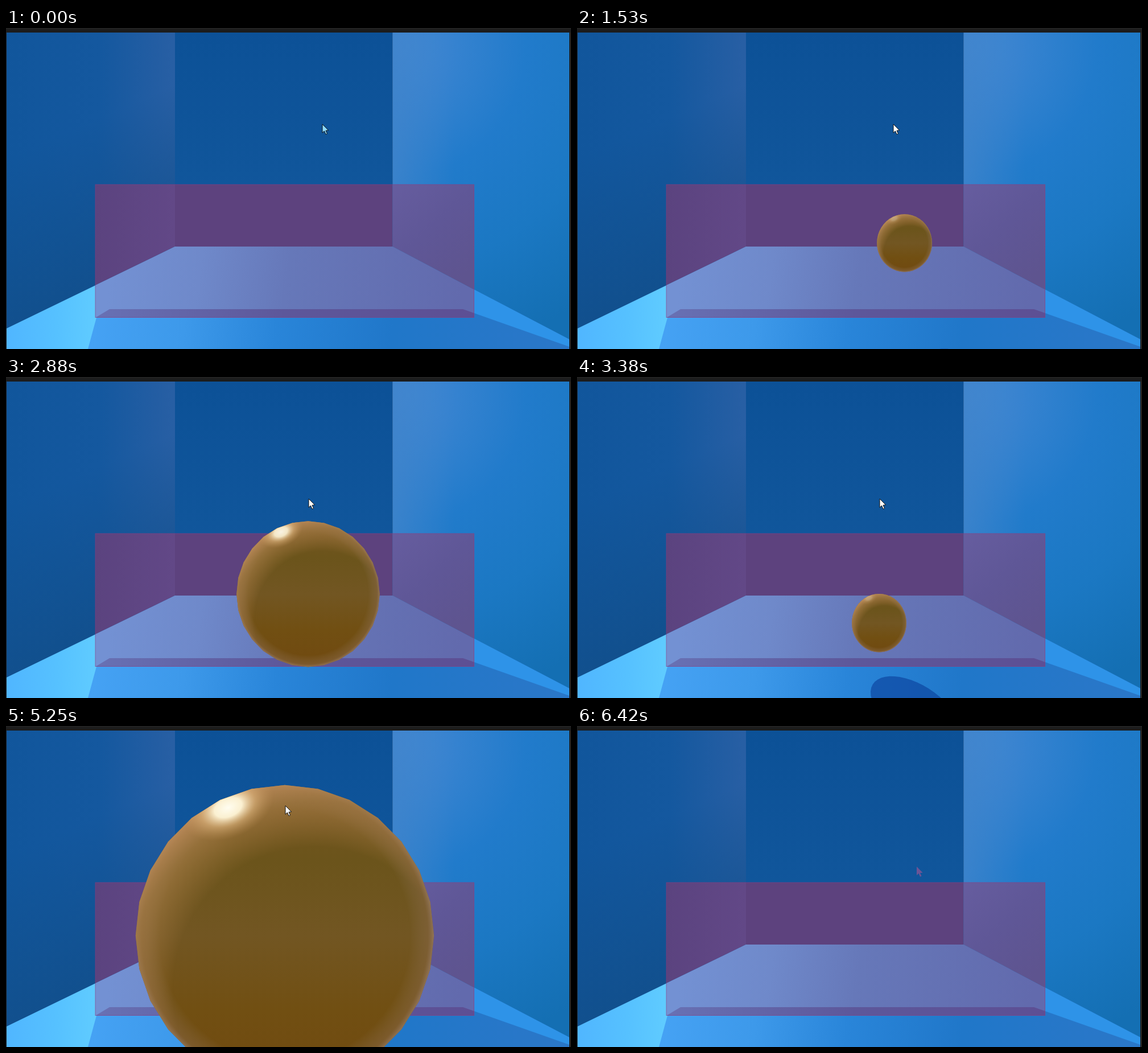
An HTML page that plays this animation: 993 by 564 pixels, repeating every 7120 ms.

```html
<!DOCTYPE html>
<html lang="en">
<head>
<meta charset="utf-8">
<title>Ball throw</title>
<style>
html, body { margin: 0; width: 100%; height: 100%; overflow: hidden; background: #1c1c1c; }
svg { display: block; width: 100vw; height: 100vh; }
</style>
</head>
<body>
<svg viewBox="0 0 993 564" preserveAspectRatio="none">
  <defs>
    <linearGradient id="leftWall"><stop offset="0" stop-color="#11569c"/><stop offset=".55" stop-color="#14589f"/><stop offset="1" stop-color="#285fa4"/></linearGradient>
    <linearGradient id="leftShade" x2=".25" y2="1"><stop offset=".4" stop-color="#114f8c" stop-opacity="0"/><stop offset="1" stop-color="#114f8c"/></linearGradient>
    <linearGradient id="backWall" x2="0" y2="1"><stop offset="0" stop-color="#0c5197"/><stop offset="1" stop-color="#12589d"/></linearGradient>
    <radialGradient id="rightWall" gradientUnits="userSpaceOnUse" cx="679" cy="30" r="560"><stop offset="0" stop-color="#4489d4"/><stop offset=".18" stop-color="#3783d0"/><stop offset=".42" stop-color="#217bcb"/><stop offset=".7" stop-color="#1b78c3"/><stop offset="1" stop-color="#146fb3"/></radialGradient>
    <linearGradient id="rightEdge"><stop offset="0" stop-color="#4084cb" stop-opacity=".8"/><stop offset=".35" stop-color="#4084cb" stop-opacity="0"/></linearGradient>
    <linearGradient id="floor" gradientUnits="userSpaceOnUse" x1="150" y1="520" x2="960" y2="590"><stop offset="0" stop-color="#45a2f4"/><stop offset=".2" stop-color="#3d99ea"/><stop offset=".4" stop-color="#2985d9"/><stop offset=".65" stop-color="#2077c9"/><stop offset="1" stop-color="#2a77c8"/></linearGradient>
    <linearGradient id="lit"><stop offset="0" stop-color="#50b6ff"/><stop offset=".55" stop-color="#56c1ff"/><stop offset="1" stop-color="#60ccff"/></linearGradient>
    <linearGradient id="panelLeft"><stop offset="0" stop-color="#5b437f"/><stop offset="1" stop-color="#624887"/></linearGradient>
    <linearGradient id="panelRight" x2=".7" y2="1"><stop offset="0" stop-color="#665d9f"/><stop offset=".5" stop-color="#5f5797"/><stop offset="1" stop-color="#5e548f"/></linearGradient>
    <linearGradient id="panelFloor" gradientUnits="userSpaceOnUse" x1="190" y1="390" x2="800" y2="480"><stop offset="0" stop-color="#7391d3"/><stop offset=".25" stop-color="#6f89ca"/><stop offset=".5" stop-color="#6678b9"/><stop offset="1" stop-color="#626aad"/></linearGradient>
    <linearGradient id="strip"><stop offset="0" stop-color="#6871b4"/><stop offset=".5" stop-color="#5d579a"/><stop offset="1" stop-color="#5d4f94"/></linearGradient>

    <linearGradient id="body" x2="0" y2="1"><stop offset="0" stop-color="#765520"/><stop offset=".25" stop-color="#6b541b"/><stop offset=".5" stop-color="#725622"/><stop offset=".75" stop-color="#714f12"/><stop offset="1" stop-color="#704910"/></linearGradient>
    <radialGradient id="rim"><stop offset=".84" stop-color="#8a7255" stop-opacity="0"/><stop offset=".96" stop-color="#876745" stop-opacity=".5"/><stop offset="1" stop-color="#977a62" stop-opacity=".85"/></radialGradient>
    <radialGradient id="glow" cx=".6" cy=".68" r=".72"><stop offset=".66" stop-color="#a87a43" stop-opacity="0"/><stop offset=".87" stop-color="#a37a45" stop-opacity=".75"/><stop offset="1" stop-color="#bf8d5c"/></radialGradient>
    <radialGradient id="spec" cx="0" cy="0" r="1" gradientTransform="translate(.31 .075) rotate(-22) scale(.16 .1)"><stop offset="0" stop-color="#fffdf0"/><stop offset=".3" stop-color="#fff6d8" stop-opacity=".95"/><stop offset=".6" stop-color="#e5bd85" stop-opacity=".5"/><stop offset="1" stop-color="#c2935a" stop-opacity="0"/></radialGradient>

    <clipPath id="floorClip"><path d="M297 384H679L989 547V564H1V528Z"/></clipPath>
    <path id="arrow" d="M0 0V15.2L3.5 12L6 17.8L8.5 16.7L6 11.2L10.6 10.8Z"/>
  </defs>

  <rect width="993" height="564" fill="#1c1c1c"/>
  <path d="M1 8H297V384L1 528Z" fill="url(#leftWall)"/>
  <path d="M1 8H297V384L1 528Z" fill="url(#leftShade)"/>
  <rect x="297" y="8" width="382.5" height="376" fill="url(#backWall)"/>
  <path d="M679.5 8H990V548L679.5 384Z" fill="url(#rightWall)"/>
  <path d="M679.5 8H990V548L679.5 384Z" fill="url(#rightEdge)"/>
  <path d="M297 384H679L990 547V564H1V528Z" fill="url(#floor)"/>
  <path d="M160 451V505L144 564H1V528Z" fill="url(#lit)"/>
  <path d="M820 458L990 547V560L820 500Z" fill="#2e93e8"/>

  <path d="M157 275H297V384L157 452Z" fill="url(#panelLeft)"/>
  <rect x="297" y="275" width="382.5" height="109" fill="#5d427e"/>
  <path d="M679.5 275H823V460L679.5 384Z" fill="url(#panelRight)"/>
  <path d="M297 384H679.5L823 460V509H157V452Z" fill="url(#panelFloor)"/>
  <path d="M182 494H803L823 501V509H157Z" fill="url(#strip)"/>
  <rect x="157" y="275" width="665.5" height="233.5" fill="none" stroke="#8c3f80" stroke-opacity=".6"/>

  <path id="shadow" fill="#0b3f9c" fill-opacity=".62" clip-path="url(#floorClip)"/>
  <g id="ball" fill-rule="evenodd">
    <path id="shape" fill="url(#body)"/>
    <path class="layer" fill="url(#rim)"/>
    <path class="layer" fill="url(#glow)"/>
    <path id="shine" class="layer" fill="url(#spec)"/>
    <path id="tint" class="layer" fill="#b02e68" fill-opacity=".4"/>
  </g>

  <path d="M0 0H993V8H0Z M0 8H1V564H0Z M990 8H993V564H990Z" fill="#1c1c1c"/>
  <path d="M0 1H993" stroke="#2b2b2b"/>
  <path d="M992.5 8V564" stroke="#303030"/>

  <use id="trail" href="#arrow" x="597" y="247" fill="#6b5596"/>
  <use id="cursor" href="#arrow" stroke="#111" stroke-width="1"/>
  <circle id="press" r="13.5" fill="#fff500" fill-opacity=".5"/>
</svg>
<script>
const LOOP = 7120;
const VX = 490, VY = 287, FOCAL = 482;   // vanishing point and focal length
const FLOOR = 4.6, NEAR = 0.98;          // in ball radii
const SPEED = 11.6, GRAVITY = 10.34, BOUNCE = 0.92;
const PANEL_Z = 10.3;

// x, drift: screen x by depth; aim: cursor height on screen; y0: launch height
const shots = [
  { from: 800, to: 1560, x: 561, drift: 1.5, aim: 169, y0: 0.57, clock: t => t - 690 },
  { from: 2600, to: 4090, x: 531, drift: 0, aim: 214, y0: 0.77, clock: t => t - 2543 },
  { from: 5200, to: 5950, x: 490, drift: 0, aim: 140, y0: 0.82,
    clock: t => t < 5460 ? 441 + (t - 5460) * 1.25 : t - 5019 },
];
const holds = [[80, 640], [2160, 2430], [4550, 5040]];
// time, x, y
const moves = [
  [1820, 556, 169], [2160, 532, 214], [4240, 532, 214], [4550, 491, 140],
  [5890, 491, 140], [5960, 538, 193], [6060, 597, 247], [6400, 690, 531],
];

const $ = id => document.getElementById(id);
const layers = document.querySelectorAll('.layer');
const clamp = (v, a = 0, b = 1) => Math.min(b, Math.max(a, v));
const show = (el, on) => el.setAttribute('visibility', on ? 'visible' : 'hidden');

function ring(n, turn, point) {
  let d = '';
  for (let i = 0; i < n; i++) {
    const a = turn + i / n * 2 * Math.PI;
    const [x, y] = point(Math.cos(a), Math.sin(a));
    d += (i ? 'L' : 'M') + x.toFixed(1) + ' ' + y.toFixed(1);
  }
  return d + 'Z';
}

function height(shot, s) {
  const slope = (shot.aim - VY) / FOCAL * SPEED, rest = FLOOR - 1;
  const hit = (-slope + Math.sqrt(slope * slope + 2 * GRAVITY * (rest - shot.y0))) / GRAVITY;
  if (s < hit) return shot.y0 + slope * s + GRAVITY * s * s / 2;
  const u = s - hit, up = BOUNCE * (slope + GRAVITY * hit);
  return Math.min(rest, rest - up * u + GRAVITY * u * u / 2);
}

function drawShadow(X, Y, z) {
  const lift = FLOOR - Y, ax = 0.42, az = -1.19;
  const len = Math.hypot(ax, az), ux = ax / len, uz = az / len;
  const stretch = Math.hypot(1, len);
  const cx = X + ax * lift, cz = z + az * lift;
  const on = cz - stretch > 0.8;
  show($('shadow'), on);
  if (!on) return;
  $('shadow').setAttribute('d', ring(40, 0, (c, s) => {
    const px = cx + ux * stretch * c - uz * s, pz = cz + uz * stretch * c + ux * s;
    return [VX + FOCAL * px / pz, VY + FOCAL * FLOOR / pz];
  }));
}

function drawBall(t) {
  const shot = shots.find(s => t >= s.from && t < s.to);
  const s = shot ? shot.clock(t) / 1000 : 0, z = SPEED * s;
  const on = z > 1.2;
  show($('ball'), on);
  show($('shadow'), false);
  if (!on) { show($('tint'), false); return; }

  const Y = height(shot, s);
  const x = shot.x + shot.drift * z, y = VY + FOCAL * Y / z;
  const X = (x - VX) * z / FOCAL;
  const r = FOCAL / Math.sqrt(z * z - 1), q = clamp(Y / 3);
  const rx = r * (1 - 0.04 * q), ry = r * (1 + 0.03 * q);
  let d = ring(r > 300 ? 26 : r > 120 ? 28 : 44, -Math.PI / 2, (c, s) => [x + rx * c, y + ry * s]);

  // opening cut by the near plane
  const cut = 1 - (z - NEAR) ** 2;
  if (cut > 0) {
    const hr = 1.05 * FOCAL * Math.sqrt(cut) / NEAR;
    const hx = VX + FOCAL * X / NEAR + 15, hy = VY + FOCAL * Y / NEAR;
    d += ring(20, -1.65, (c, s) => [hx + hr * c, hy + hr * s]);
  }
  $('shape').setAttribute('d', d);
  layers.forEach(l => l.setAttribute('d', d));
  $('shine').setAttribute('opacity', clamp(1.35 - 0.11 * z));
  show($('tint'), z > PANEL_Z);
  drawShadow(X, Y, z);
}

function cursorAt(t) {
  const i = moves.findIndex(m => m[0] > t);
  if (i === 0) return moves[0].slice(1);
  if (i < 0) return moves[moves.length - 1].slice(1);
  const [t0, x0, y0] = moves[i - 1], [t1, x1, y1] = moves[i];
  const k = (t - t0) / (t1 - t0);
  return [x0 + (x1 - x0) * k, y0 + (y1 - y0) * k];
}

function drawCursor(t) {
  const [x, y] = cursorAt(t);
  const held = holds.some(([a, b]) => t >= a && t < b);
  const cursor = $('cursor'), press = $('press');
  cursor.setAttribute('x', x);
  cursor.setAttribute('y', y);
  cursor.setAttribute('fill', held ? '#ffff90' : t < 40 ? '#8fdcff' : '#fff');
  show(cursor, t < 6410);
  press.setAttribute('cx', x);
  press.setAttribute('cy', y);
  show(press, held);
  show($('trail'), t > 6100);
}

function draw(t) {
  drawBall(t);
  drawCursor(t);
}

const start = performance.now();
function tick() {
  draw((performance.now() - start) % LOOP);
  requestAnimationFrame(tick);
}
draw(0);
requestAnimationFrame(tick);
</script>
</body>
</html>
```
